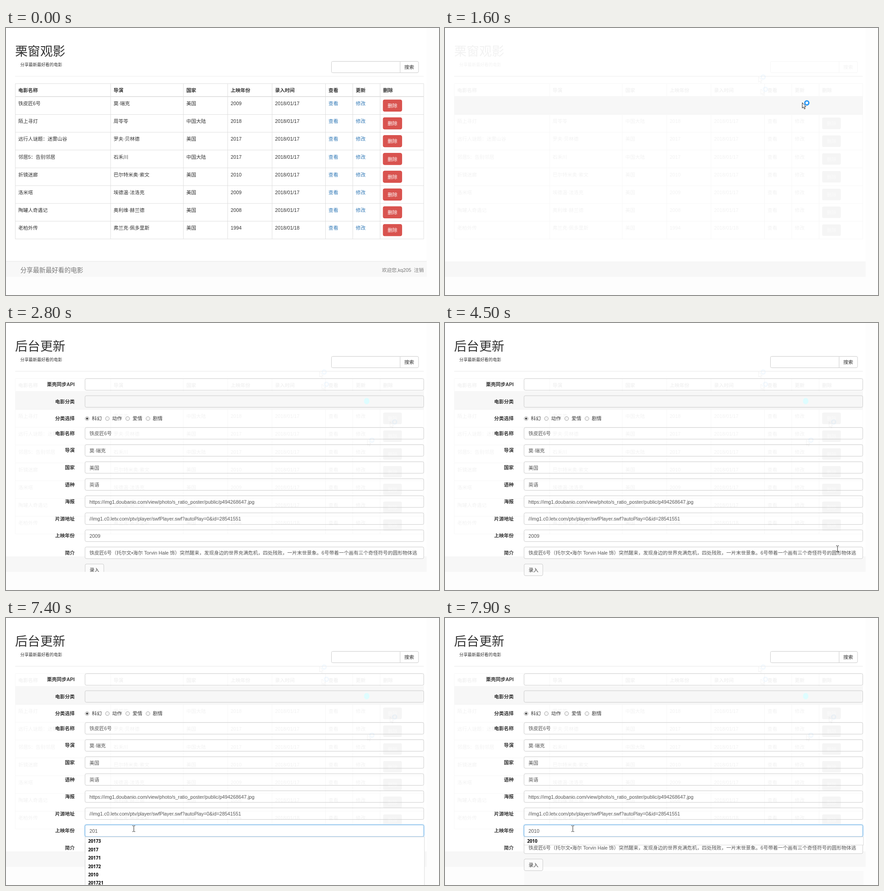
Animation, 952 px wide and 588 px high, one loop 8000 ms. Source, as an HTML page:

```html
<!DOCTYPE html>
<html lang="zh-CN">
<head>
<meta charset="utf-8">
<title>后台更新</title>
<style>
  html, body { margin: 0; width: 100%; height: 100%; overflow: hidden; background: #fdfdfd; }
  svg { display: block; width: 952px; height: 588px; }
  text { font: 10.75px "Liberation Sans", "Noto Sans CJK SC", "Noto Sans CJK", sans-serif; fill: #333; white-space: pre; }
  .title { font-size: 27.6px; }
  .small { font-size: 9.2px; }
  .brand { font-size: 13.85px; }
  .bold { font-weight: 700; }
  .end { text-anchor: end; }
  .mid { text-anchor: middle; }
  .grey { fill: #777; }
  .val { fill: #555; }
  .link { fill: #337ab7; }
  .on { fill: #fff; }
  .opt { font: 700 9.8px "Open Sans", "Noto Sans", sans-serif; fill: #000; }
  .grid { fill: none; stroke: #ddd; stroke-width: .9; }
  .box { fill: none; stroke: #ccc; }
  .btn { fill: #d9534f; stroke: #d43f3a; }
  .ghost text { fill: #f2f2f2; }
  .ghost .grid, .ghost .box { stroke: #f6f6f6; }
  .ghost .btn { fill: #f5f5f5; stroke: none; }
  .ghost .on { fill: #fbfbfb; }
</style>
</head>
<body>
<svg id="stage" viewBox="0 0 952 588"></svg>
<script>
const LOOP = 8000, STEP = 100, ROW = 39.17, TOP = 151.3, FIELD = 37.58;

const text = (x, y, s, cls = '') => `<text x="${x}" y="${y}" dy=".37em" class="${cls}">${s}</text>`;
const rect = (x, y, w, h, attrs) => `<rect x="${x}" y="${y}" width="${w}" height="${h}" ${attrs}/>`;
const during = (from, to, body) => `<g class="timed" data-from="${from}" data-to="${to}">${body}</g>`;

const cols = [20.5, 230, 390, 487.5, 585, 702.5, 762.5, 822.5, 918.5];
const heads = ['电影名称', '导演', '国家', '上映年份', '录入时间', '查看', '更新', '删除'];
const US = '美国', CN = '中国大陆';
const films = [
  ['铁皮匠6号', '莫·瑞克', US, 2009],
  ['陌上寻灯', '周苓苓', CN, 2018],
  ['远行人谜题：迷雾山谷', '罗夫·贝林德', US, 2017],
  ['邻居5：告别邻居', '石禾川', CN, 2017],
  ['折镜迷廊', '巴尔特米奥·索文', US, 2010],
  ['洛米塔', '埃德温·法洛克', US, 2009],
  ['陶罐人奇遇记', '奥利维·赫兰德', US, 2008],
  ['老柏外传', '弗兰克·佩多里斯', US, 1994],
];

function grid() {
  const bottom = TOP + ROW * films.length;
  let d = `M20.5 122.5H918.5M20.5 151.3H918.5`;
  cols.forEach(x => d += `M${x} 122.5V${bottom}`);
  films.forEach((_, i) => d += `M20.5 ${TOP + ROW * (i + 1)}H918.5`);
  return `<path class="grid" d="${d}"/><path class="grid" d="M20.5 150.7H918.5"/>`;
}

function filmRow(film, i) {
  const top = TOP + ROW * i, y = top + 14.8;
  const day = i === films.length - 1 ? '2018/01/18' : '2018/01/17';
  const cells = [...film, day, '查看', '修改'];
  return cells.map((s, c) => text(cols[c] + 6.5, y, s, c > 4 ? 'link' : '')).join('') +
    rect(829.2, top + 6.9, 41, 25.4, 'rx="3" class="btn"') +
    text(849.7, top + 19.8, '删除', 'mid on');
}

const header = title => text(20, 50.5, title, 'title') + text(31.5, 81, '分享最新最好看的电影', 'small');
const search =
  `<path class="box" d="M866.5 73.5H718.5a3 3 0 0 0-3 3V95.5a3 3 0 0 0 3 3H866.5ZM866.5 73.5H904a3 3 0 0 1 3 3V95.5a3 3 0 0 1-3 3H866.5"/>` +
  text(886.5, 86, '搜索', 'mid');
const rule = '<path stroke="#eee" d="M20 106.3H918.5"/>';
const table = from => grid() +
  heads.map((s, i) => text(cols[i] + 6.5, 136.7, s, 'bold')).join('') +
  films.map((f, i) => i < from ? '' : filmRow(f, i)).join('');

const listPage =
  during(800, 1600, rect(20.5, TOP, 898, ROW, 'fill="#f5f5f5"')) +
  header('栗窗观影') + search + rule + table(0) +
  during(1000, 1600, '<path stroke="#23527c" stroke-width=".8" d="M769 172H790.5"/>') +
  rect(0, 514, 925, 34, 'fill="#f8f8f8"') + '<path stroke="#e7e7e7" d="M0 513.8H925"/>' +
  text(31.5, 533, '分享最新最好看的电影', 'brand grey') +
  text(891, 533.5, '欢迎您,kq205', 'end grey') + text(918.5, 533.5, '注销', 'end grey');

const arrow = '<path fill="#fff" stroke="#111" stroke-width=".9" d="M.5 .5V12.3L3.2 9.8 5.1 14.4 7 13.6 5.1 9.2H8.6Z"/>';
const busy = arrow + '<circle cx="10.5" cy="1" r="4.4" fill="#fff" stroke="#2b97f3" stroke-width="3"/>';
const hand = '<path fill="#fff" stroke="#111" stroke-width=".9" d="M-1.2 12V1.6a1.3 1.3 0 0 1 2.6 0V7.5l5.4 1.2q1.7.5 1.7 2.2V14l-1.7 5H0L-4.6 12.2q.7-2 2.3-1Z"/>';
const beam = '<path fill="none" stroke="#222" d="M-3 -6.5H-1L0 -5.5 1 -6.5H3M0 -5.5V5.5M-3 6.5H-1L0 5.5 1 6.5H3"/>';
const trace = (x, y) => `<g opacity=".05" transform="translate(${x} ${y})">${busy}</g>`;

const ghost = '<g class="ghost">' +
  rect(20.5, TOP, 898, ROW, 'fill="#f7f7f7"') + rect(0, 514, 925, 34, 'fill="#f7f7f7"') +
  during(1600, 1800, header('栗窗观影') + search) + rule + table(1) + '</g>' +
  trace(689, 107) + trace(694, 134);

const synopsis = '铁皮匠6号（托尔文•海尔 Torvin Hale 饰）突然醒来，发现身边的世界充满危机，四处残败，一片末世景象。6号带着一个画有三个奇怪符号的圆形物体逃';
const fields = [
  ['栗壳同步API', ''], ['电影分类', ''], null,
  ['电影名称', films[0][0]], ['导演', films[0][1]], ['国家', US], ['语种', '英语'],
  ['海报', 'https://img1.doubanio.com/view/photo/s_ratio_poster/public/p494268647.jpg'],
  ['片源地址', '//img1.c0.letv.com/ptv/player/swfPlayer.swf?autoPlay=0&amp;id=28541551'],
  ['上映年份', ''], ['简介', synopsis],
];

function field(f, i) {
  if (!f) return '';
  const top = i < 2 ? 122.5 + FIELD * i : 230.2 + FIELD * (i - 3);
  const fill = i === 10 ? 'style="fill:#fff"' : '';
  return rect(173.8, top, 744.7, 25.6, `rx="3" class="box" ${fill}`) +
    text(151, top + 12.6, f[0], 'bold end') +
    `<g clip-path="url(#inner)">${text(183.5, top + 13.2, f[1], 'val')}</g>`;
}

const radio = (s, i) => {
  const x = 178.3 + 44.6 * i;
  return `<circle cx="${x}" cy="210.5" r="4.3" fill="#f4f4f4" stroke="#999" stroke-width=".9"/>` +
    (i ? '' : `<circle cx="${x}" cy="210.5" r="2.3" fill="#444"/>`) + text(x + 10.7, 210.5, s);
};

const formPage = header('后台更新') + search + rule +
  '<ellipse cx="793" cy="172" rx="6" ry="7" fill="#defdff"/>' +
  fields.map(field).join('') +
  text(151, 210.3, '分类选择', 'bold end') + ['科幻', '动作', '爱情', '剧情'].map(radio).join('') +
  rect(174, 530.8, 41, 25.6, 'rx="3" class="box" style="fill:#fbfbfb"') + text(194.5, 543.6, '录入', 'mid') +
  during(1800, 3800, rect(170, 548, 50, 12, 'fill="#fdfdfd"'));

const popup = (items, h) => rect(174, 482, 746, h, 'fill="#fff" stroke="#d4d4d4" stroke-width=".9"') +
  items.map((s, i) => text(180.7, 491.8 + 18.4 * i, s, 'opt')).join('');
const years = popup([20173, 2017, 20171, 20172, 2010, 201721], 120);
const faded = (alpha, body) => `<g opacity="${alpha}">${body}</g>`;
const year = s => text(183.5, 468.7, s, 'val');

const yearInput =
  during(6600, 6700, rect(172.5, 454.4, 747.3, 28.2, 'rx="4" fill="none" stroke="#d5e8f8"')) +
  during(6600, LOOP,
    rect(172.6, 454.5, 747.1, 28, 'rx="4" fill="none" stroke="#cfe6f8" stroke-width="1.6"') +
    rect(173.8, 455.7, 744.7, 25.6, 'rx="3" fill="#fff" stroke="#66afe9"')) +
  during(6800, 7100, rect(183.5, 462, 24, 13, 'fill="#3390ff"')) +
  during(1800, 6800, year('2009')) +
  during(6800, 7100, text(183.5, 468.7, '2009', 'on')) +
  during(7100, 7200, year('2')) + during(7200, 7400, year('20')) +
  during(7400, 7600, year('201')) + during(7600, LOOP, year('2010')) +
  during(7100, 7600, years) +
  during(7600, LOOP, rect(174, 557, 746, 31, 'fill="#f9f9f9"')) +
  during(7600, 7800, faded(.4, years)) + during(7800, 7900, faded(.15, years)) +
  during(7600, LOOP, popup([2010], 18));

const shapes = { arrow, busy, hand, beam };
// time, x, y, pointer shape
const path = [
  [0, 757, 28, ''], [100, 757, 28, 'busy'], [300, 755, 80, 'busy'], [500, 689, 107, 'busy'],
  [600, 694, 134, 'busy'], [900, 785, 164, 'arrow'], [1000, 785, 164, 'hand'], [1600, 785, 164, 'busy'],
  [2000, 785, 164, 'busy'], [2400, 790, 228, 'busy'], [2500, 794, 257, 'busy'], [2600, 748, 270, 'arrow'],
  [2700, 844, 217, 'arrow'], [2800, 863, 497, ''], [4500, 863, 497, 'beam'], [4600, 863, 497, 'beam'],
  [5000, 314, 232, 'beam'], [5100, 314, 232, 'beam'], [5300, 342, 262, 'beam'], [5600, 300, 330, 'beam'],
  [6000, 230, 474, 'beam'], [6400, 208, 471, 'beam'], [6700, 208, 471, 'beam'], [6900, 281, 464, 'beam'],
  [LOOP, 281, 464, 'beam'],
];

const stage = document.getElementById('stage');
stage.innerHTML =
  '<defs><clipPath id="inner"><rect x="183" y="120" width="726" height="420"/></clipPath></defs>' +
  rect(0, 0, 925, 548, 'fill="#fff"') +
  during(0, 1600, listPage) + during(1600, LOOP, ghost) +
  during(1800, LOOP, formPage + yearInput) +
  during(2800, LOOP, trace(794, 257) + trace(844, 217)) +
  '<g id="pointer">' + Object.keys(shapes).map(k => `<g data-shape="${k}">${shapes[k]}</g>`).join('') + '</g>';

const timed = [...stage.querySelectorAll('.timed')].map(el => ({ el, from: +el.dataset.from, to: +el.dataset.to }));
const pointer = document.getElementById('pointer');

function draw(now) {
  const t = Math.floor(now % LOOP / STEP) * STEP;
  for (const { el, from, to } of timed) el.style.display = t >= from && t < to ? '' : 'none';
  const n = path.findIndex(p => p[0] > t);
  const [t0, x0, y0, shape] = path[n - 1], [t1, x1, y1] = path[n];
  const k = (t - t0) / (t1 - t0);
  pointer.setAttribute('transform', `translate(${x0 + (x1 - x0) * k} ${y0 + (y1 - y0) * k})`);
  for (const g of pointer.children) g.style.display = g.dataset.shape === shape ? '' : 'none';
}

function tick(now) {
  draw(now);
  requestAnimationFrame(tick);
}
draw(performance.now());
requestAnimationFrame(tick);
</script>
</body>
</html>
```
